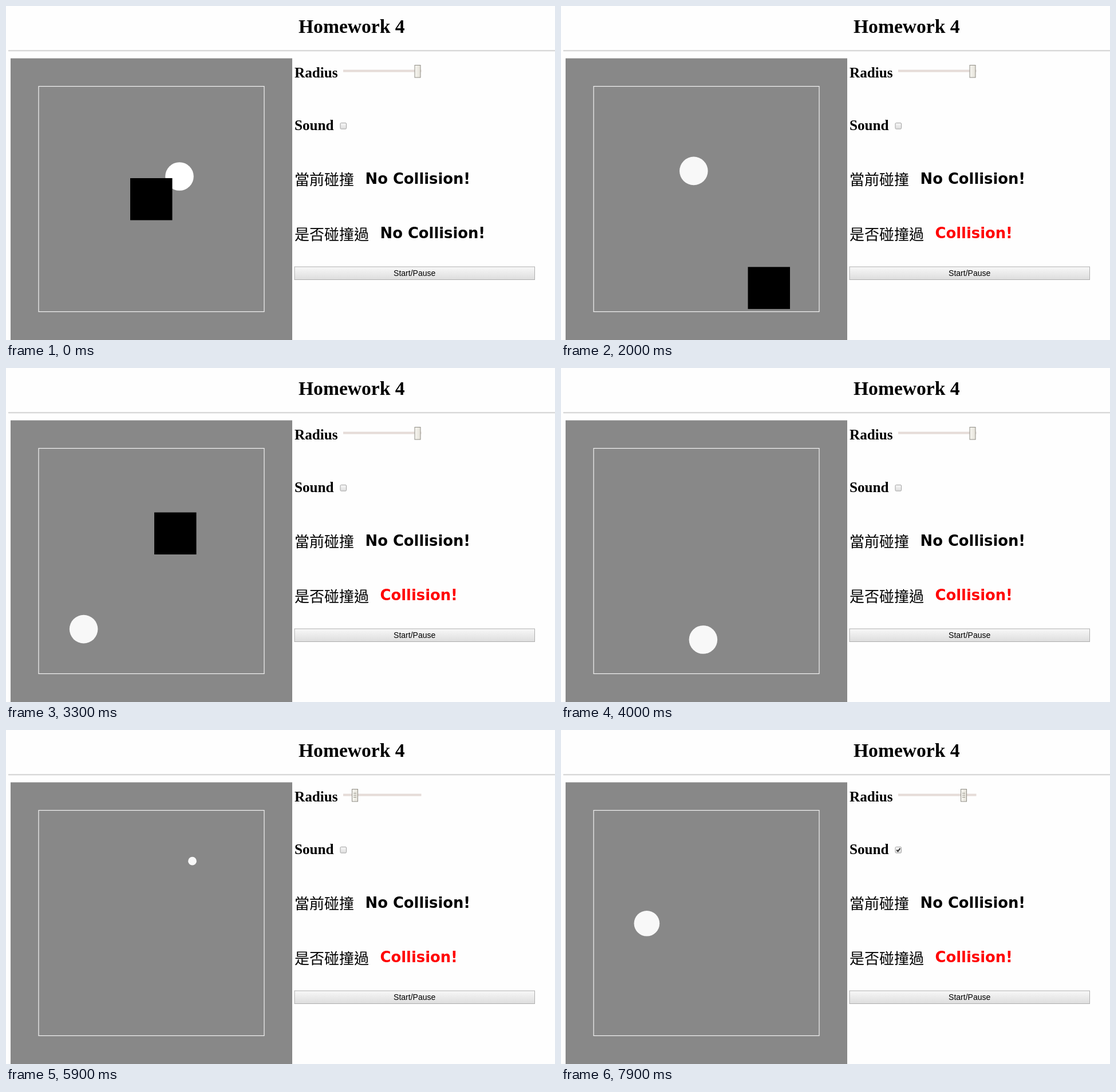
These frames come from a looping animation (959 by 584 pixels, 8000 ms). An HTML page:

```html
<!DOCTYPE html>
<html lang="zh-Hant">
<head>
<meta charset="utf-8">
<title>Homework 4</title>
<style>
  html, body { margin: 0; width: 100%; height: 100%; overflow: hidden; background: #fefefe; }
  svg { display: block; width: 959px; height: 584px; }
  .serif { font: bold 25.2px "Liberation Serif", serif; }
  .title { font-size: 33.6px; }
  .cjk { font: 300 26px "Noto Sans CJK TC", "Noto Sans CJK", sans-serif; }
  .status { font: bold 25.8px "DejaVu Sans", sans-serif; }
  .button { font: 14px "Liberation Sans", sans-serif; text-anchor: middle; }
</style>
</head>
<body>
<svg viewBox="0 0 959 584">
  <defs>
    <linearGradient id="face" x2="0" y2="1">
      <stop offset="0" stop-color="#f8f8f8"/>
      <stop offset="1" stop-color="#dddddd"/>
    </linearGradient>
    <linearGradient id="knob" x2="1" y2="0">
      <stop offset="0" stop-color="#f7f6f1"/>
      <stop offset="1" stop-color="#e5e2d9"/>
    </linearGradient>
  </defs>

  <text class="serif title" x="511" y="47">Homework 4</text>
  <path d="M4 78H959" stroke="#a4a4a4"/>
  <path d="M4 79H959" stroke="#e6e6e6"/>

  <rect x="8" y="91.5" width="492" height="492.5" fill="#888"/>
  <rect x="57" y="140.5" width="394" height="394" fill="none" stroke="#f4f4f4" stroke-width="1.2"/>
  <circle id="ball"/>
  <rect id="box" width="73.5" height="73.5"/>

  <text class="serif" x="504" y="125">Radius</text>
  <rect x="589" y="111.5" width="136.5" height="4" fill="#e5dcd8"/>
  <g id="thumb">
    <rect x="-5" y="103.5" width="10" height="21.5" fill="url(#knob)" stroke="#8f8d85"/>
    <path id="grip" d="M-2.5 110.5h5m-5 3.5h5m-5 3.5h5" stroke="#97948a"/>
  </g>

  <text class="serif" x="504" y="217">Sound</text>
  <rect x="584" y="204.5" width="10.5" height="10.5" rx="1.5" fill="url(#face)" stroke="#a2a2a2"/>
  <path id="tick" d="M586.3 209.8l2.2 2.4 4-5.4" fill="none" stroke="#333" stroke-width="2"/>

  <text class="cjk" x="504" y="312.5">當前碰撞</text>
  <text class="status" x="627.6" y="310.5">No Collision!</text>
  <text class="cjk" x="504" y="408.5">是否碰撞過</text>
  <text class="status" id="history" x="653.6" y="406.3"></text>

  <rect x="504" y="456" width="419.5" height="22.5" fill="url(#face)" stroke="#aeaeae"/>
  <text class="button" x="713.7" y="472">Start/Pause</text>
</svg>
<script>
  const LOOP = 8000, TICK = 100;
  const el = id => document.getElementById(id);
  const [ball, box, thumb, grip, tick, history_] =
    ["ball", "box", "thumb", "grip", "tick", "history"].map(el);

  // Constant speed between successive turning points.
  function bounce(distance, start, walls) {
    let from = start;
    for (const wall of walls) {
      const span = Math.abs(wall - from);
      if (distance <= span) return from + Math.sign(wall - from) * distance;
      distance -= span;
      from = wall;
    }
    return from;
  }

  // Last value whose time has come.
  const held = (t, steps) => steps.reduce((v, [at, next]) => t >= at ? next : v, steps[0][1]);

  // Linear path through [time, x, y] points.
  function along(t, path) {
    const i = path.findIndex(p => p[0] > t);
    if (i < 0) return path[path.length - 1].slice(1);
    const [a, b] = [path[i - 1], path[i]];
    const k = (t - a[0]) / (b[0] - a[0]);
    return [a[1] + (b[1] - a[1]) * k, a[2] + (b[2] - a[2]) * k];
  }

  const slider = [[0, 719], [4300, 672], [5000, 628.5], [5700, 609.5],
                  [6200, 659.5], [6600, 672], [6700, 685.5], [6900, 703.5]];
  const drag = [[0, 217, 301], [1200, 217, 301], [1800, 326.5, 456.3],
                [2500, 326.5, 456.3], [3200, 259, 252.5]];

  const show = (node, on) => node.setAttribute("visibility", on ? "visible" : "hidden");

  function draw(t) {
    const knob = held(t, slider);
    ball.setAttribute("cx", bounce(t * 0.1611, 303, [428.5, 79, 440, 76.6, 440]));
    ball.setAttribute("cy", bounce(t * 0.1294, 298, [163.8, 511.1, 154.3, 511]));
    ball.setAttribute("r", 7.4 + (knob - 609.5) / 6.3);
    ball.setAttribute("fill", t < 100 ? "#fff" : "#f8f8f8");

    const [x, y] = along(t, drag);
    box.setAttribute("x", x);
    box.setAttribute("y", y);
    show(box, t < 4000);

    thumb.setAttribute("transform", `translate(${knob} 0)`);
    show(grip, t >= 5700);
    show(tick, t >= 7600);
    history_.textContent = t < 100 ? "No Collision!" : "Collision!";
    history_.setAttribute("fill", t < 100 ? "#000" : "#f00");
  }

  const begin = performance.now();
  function frame() {
    const t = (performance.now() - begin) % LOOP;
    draw(Math.floor(t / TICK) * TICK);
    requestAnimationFrame(frame);
  }
  frame();
</script>
</body>
</html>
```
